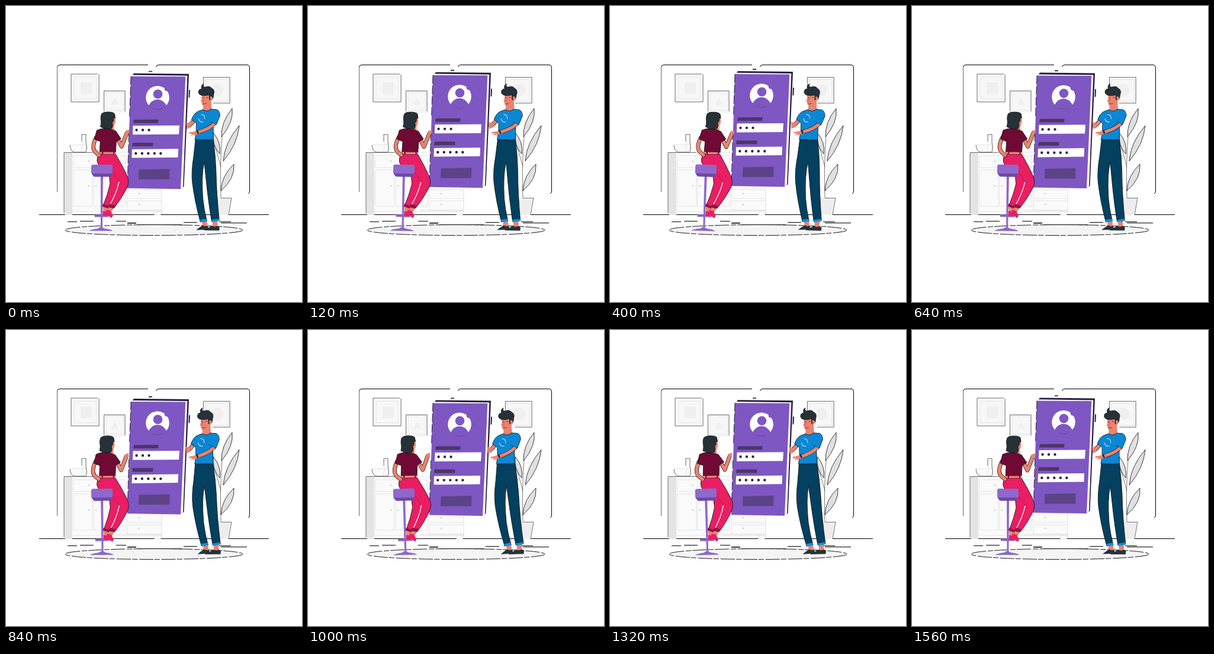
An HTML page that plays this animation: 500 by 500 pixels, repeating every 1600 ms.

```html
<!DOCTYPE html>
<html lang="en">
<head>
<meta charset="utf-8">
<title>Login illustration</title>
<style>
html, body { margin: 0; height: 100%; overflow: hidden; background: #fff; }
svg { display: block; width: 100vw; height: 100vh; }
.line { fill: none; stroke: #000; }
.fine { fill: none; stroke: #222; stroke-width: .6; }
.edge { stroke: #111; stroke-width: .8; stroke-linejoin: round; }
.skin { fill: #e98370; }
.arm { fill: none; stroke: #e98370; stroke-linecap: round; stroke-linejoin: round; stroke-width: 5.5; }
.arm.rim { stroke: #111; stroke-width: 6.8; }
.purple { fill: #7e57c2; }
.stool { fill: #8f68cb; }
.dark { fill: #263238; }
.gray { stroke: #dcdcdc; stroke-width: .7; fill: #fafafa; }
.leaf { fill: #e0e0e0; stroke: #111; stroke-width: .8; }
</style>
</head>
<body>
<svg viewBox="0 0 500 500">
  <defs>
    <path id="herArms" d="M152 222Q144 238 150 246L157 252M188 224L195 237L204 214"/>
    <path id="hisFarArm" d="M320 189Q315 198 308 203"/>
    <path id="hisNearArm" d="M351 199Q344 207 325 213"/>
  </defs>

  <g id="room">
    <path class="line" d="M240 99.500H91Q87 99.500 86.500 103M253.500 103Q254 99.500 258 99.500H408Q411.500 100 411.500 104V315L409 317"/>
    <path class="line" stroke-opacity=".6" d="M86.500 103V314"/>
    <path class="line" d="M56 352.500H444"/>

    <g class="gray">
      <path d="M110 115H158V162H110ZM166 143H202V179H166ZM333 120H379V165H333Z"/>
      <path fill="#f7f7f7" d="M115 120H153V157H115ZM169 146H199V176H169ZM337 124H375V161H337Z"/>
    </g>
    <path fill="#efefef" d="M126 129H145V149H126ZM184 155L191 167H177Z"/>
    <circle cx="357" cy="142" r="10.500" fill="#efefef"/>
    <path class="fine" d="M110 115V162H157V116M110 115H155M165.500 178V143.500H201V178M333.500 138V120.500H378V164H350"/>

    <g class="gray">
      <path d="M98 247H263V347H98Z"/>
      <path d="M114 253H202V273H114ZM114 277H146V338H114ZM148 277H202V338H148ZM205 310H263V325H205ZM205 329H263V345H205ZM250 347H263L261 353H251ZM190 345H263V347H190Z"/>
      <path d="M108 234H136Q136 247 128 247H116Q108 247 108 234ZM128 217H135V229Q139 247 133 247H126Q131 236 128 229Z"/>
    </g>
    <path fill="#e4e4e4" d="M98 247H112V353H100L98 347Z"/>
    <g fill="#d6d6d6">
      <circle cx="140" cy="262" r="1.600"/><circle cx="140" cy="304" r="1.600"/><circle cx="152" cy="304" r="1.600"/>
      <circle cx="225" cy="317" r="1.600"/><circle cx="225" cy="335" r="1.600"/>
    </g>
    <path class="fine" d="M98 248V350M98 247.500H146M108 235Q109 246 116 247H134Q138 245 135 230V217H128V229"/>

    <path class="fine" d="M363 326Q361 270 365 220M363 272Q356 245 351 232M363 313L372 293"/>
    <g class="leaf">
      <path d="M364 221Q363 196 382 173Q385 196 364 221Z"/>
      <path d="M367 262Q369 231 394 202Q391 234 367 262Z"/>
      <path d="M363 312Q364 287 385 267Q387 292 363 312Z"/>
      <path d="M361 250Q348 236 350 214Q364 230 361 250Z"/>
    </g>
    <path fill="#ededed" d="M353 324H381L376 353H357Z"/>
    <path class="fine" d="M363 324.500H381L376 353"/>

    <ellipse cx="250" cy="378.500" rx="150" ry="9" fill="#f4f4f4" stroke="#000" stroke-width=".9" stroke-dasharray="24 3 9 2"/>
    <path class="line" d="M104 364.500H120M125 363.500H148M186 363.500H203M222 369.500H297M300 365.500H323M363 366.500H407M360 364.500H380"/>
    <path class="line" stroke-width="1.600" d="M205 366.700H220"/>
  </g>

  <g id="phone">
    <path fill="#281c42" d="M216 114L309 115L300.500 305.500L296 307L212 119ZM241 110H247V111.600H241ZM309 142H311L310.500 154L308.500 156Z"/>
    <path fill="#fff" d="M213 116.800L306.300 118L299 305.500L294 308L210 120Z"/>
    <path class="purple" d="M211 119L303.300 119.500L295 309.500L205 308Z"/>
    <path class="line" stroke-width=".8" stroke-dasharray="14 4" d="M211 119L208.500 190M207.500 216L205 306"/>
    <circle cx="256" cy="155" r="19.800" fill="#fff"/>
    <g class="purple">
      <circle cx="256.500" cy="149" r="7.800"/>
      <path d="M240 170Q246 158 256 158Q266 158 272 170L268 177H244Z"/>
      <path d="M267 136L277 139L274 144Q270 145 268 142Z"/>
    </g>
    <path fill="none" stroke="#5f4492" stroke-width=".8" d="M247 173Q256 177 265 173"/>
    <path fill="#4a3766" d="M216 192.200L257.500 192L257 198H215ZM214 231.200H248.500L248 237.300H213Z"/>
    <path fill="#fff" d="M214.500 202.500L293 202L292 217L214 217.500ZM213 242.300L291 241.500L290.500 256L212.500 256.800Z"/>
    <path id="dots" fill="#2c2144"/>
    <path fill="#5c4387" d="M224.500 276.500L276.500 275.500L276 293H224Z"/>
  </g>

  <g id="woman">
    <path class="stool" d="M160 286H164L163.500 376H160.500ZM150 352.500H174V356.500H150ZM141 380Q143 377.500 156 376Q161 371 167 376Q180 377.500 181 380Z"/>
    <path class="skin" d="M164 340L173 341L170 349L165 347ZM172 339L182 342L177 350L171 346Z"/>
    <path fill="#e91e63" d="M164 346L171 348L175 353L170 355L164 354ZM170 344L177 346L181 354L179 358Q174 355 168 351Z"/>
    <path class="edge" fill="#e91e63" d="M157 250H185Q196 268 205 287Q209 297 205 306Q195 326 183 341L164 338Q172 319 176 300L173 273L158 270Q150 262 157 250Z"/>
    <path fill="none" stroke="#fff" stroke-width="1.300" d="M191 297Q187 317 174 339"/>
    <path fill="none" stroke="#a90f43" stroke-width=".7" d="M175 273Q183 285 191 296"/>
    <path fill="#8e1741" d="M164 334L174 338L173 342L163 339ZM175 334L185 337L182 342L172 339Z"/>
    <path class="stool" d="M147 268H177Q180 268 180 271V281Q180 285 176 285H148Q144 285 144 281V271Q144 268 147 268Z"/>
    <path fill="#6a4aa8" d="M145 283H179L177 288.500H150Q147 288 145 283Z"/>
    <use href="#herArms" class="arm rim"/>
    <use href="#herArms" class="arm"/>
    <path class="skin" d="M201 216L202 210L208 208.500L207.500 214L204 218Z"/>
    <path class="skin" d="M167 202H182V209Q174 213 167 209Z"/>
    <path class="edge" fill="#700a34" d="M153 210Q164 205 172 208Q179 208 185 211L194 224L186 229L185 247H158L159 229L149 225Z"/>
    <path class="skin" d="M158 246.500H185V249H158Z"/>
    <path fill="#700a34" d="M162 246H164V250H162ZM181 246H183V250H181Z"/>
    <path class="skin" d="M176 184H183.500L184.500 195L182 203H173Z"/>
    <path class="dark edge" d="M161 182Q164 179 170 179Q180 178.500 183 182L184 189L181 189Q183 193 179 197Q181 202 178 207Q168 209 159 204Q161 198 159.500 190Q159.500 185 161 182Z"/>
  </g>

  <g id="man">
    <path class="skin" d="M332 362L340 362L341 373L332 374ZM349 362L358 362L358 373L350 374Z"/>
    <path class="dark" d="M322 378.500Q326 375 333 370.500Q338 373 341.500 371L343 377L334 378ZM334 379Q342 376 348 371Q354 374 358 371L361.500 373.500L361 379Z"/>
    <path class="edge" fill="#04405f" d="M320 225H350Q354 253 355 278Q356 318 361 362L348 364Q342 328 339 300L335 264Q330 285 333 325Q335 344 340 363L329 365Q319 329 315 298Q313 279 317 254Z"/>
    <path fill="#1a8dd8" d="M328.500 361L340 359.500L340.500 363.500L329.500 365.500ZM347.500 361L360.500 359L361 362.500L348.500 364.500Z"/>
    <use href="#hisFarArm" class="arm rim"/>
    <use href="#hisFarArm" class="arm"/>
    <path class="skin" d="M304 196L310 199L311 206L305 208Z"/>
    <path class="skin" d="M333 163L346 161L347 176Q340 182 332 177Z"/>
    <path class="edge" fill="#0c87d4" d="M332 175Q339 180 346 174L356 175Q361 178 361 185L355 200L350 202L350 226H319Q322 212 321 198L313 192Q317 181 324 178Z"/>
    <use href="#hisNearArm" class="arm rim"/>
    <use href="#hisNearArm" class="arm"/>
    <path fill="#0c87d4" d="M348 181Q356 174 360 180Q362 188 355 200L343 194Z"/>
    <path class="fine" d="M343 194L355 200L361 185"/>
    <path class="skin" d="M327 210L327 216L318 218L310 219L316 216L309 216L310 213.500L318 212Z"/>
    <path class="dark" d="M321 210.500L324 209.500L326 215.500L323.500 216.500Z"/>
    <path fill="none" stroke="#d8eeff" d="M325 190Q326 197 333 196M329 183.500Q336 183 335.500 191"/>
    <path class="skin" d="M330 148L346 147Q351 154 346 160Q345 169 338 171Q331 171 330 163L328.500 160L330 157Z"/>
    <path class="dark edge" d="M330 151Q323 149 325 143Q326 140 330 140Q328 134 333 131.500Q331 137 336 137Q343 134 347 139Q353 142 350 150Q350 157 346 159L343 158L343 150Q336 152 330 151Z"/>
    <path class="skin" d="M344 153Q350 152 348 158L345 161Z"/>
    <path fill="none" stroke="#263238" stroke-width=".8" d="M331 155H334M338 154.500H341M332 165Q335 166 338 164.500"/>
    <path fill="none" stroke="#c7594f" stroke-width=".8" d="M334 156L332.500 161H335"/>
  </g>
</svg>
<script>
const LOOP = 1600, LOWEST = 1155;
const el = id => document.getElementById(id);

const dot = (x, y) => `M${x - 2.2} ${y}a2.2 2.2 0 1 0 4.4 0a2.2 2.2 0 1 0 -4.4 0`;
const row = (x, y, count) =>
  Array.from({ length: count }, (_, i) => dot(x + i * 10.5, y)).join("");
el("dots").setAttribute("d", row(220.5, 209.8, 3) + row(219.3, 249.2, 5));

// The phone bobs while both people sway about their hips.
function draw(now) {
  const sway = Math.cos((now % LOOP - LOWEST) / LOOP * 2 * Math.PI);
  el("phone").setAttribute("transform", `translate(0 ${4.6 * sway + .6})`);
  el("woman").setAttribute("transform", `rotate(${-1.95 * sway} 162 278)`);
  el("man").setAttribute("transform", `rotate(${-1.9 * sway} 336 248)`);
  requestAnimationFrame(draw);
}
draw(performance.now());
</script>
</body>
</html>
```
